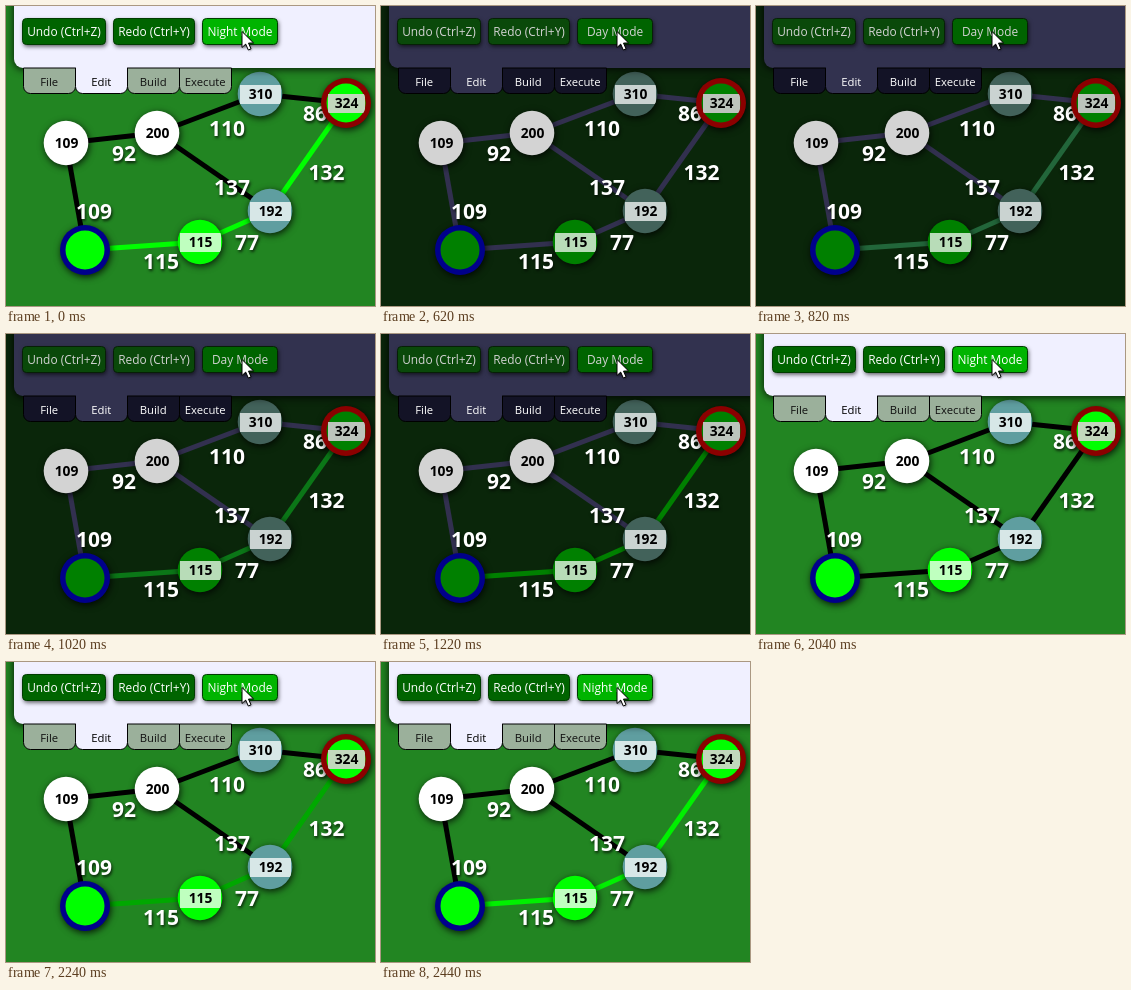
These frames come from a looping animation (369x300 px, 2.64 s). An HTML page with a canvas:

```html
<!DOCTYPE html>
<html lang="en">
<head>
<meta charset="utf-8">
<title>Graph editor day and night</title>
<style>
html, body { margin: 0; width: 100%; height: 100%; overflow: hidden; background: #228522; }
canvas { display: block; width: 369px; height: 300px; }
</style>
</head>
<body>
<canvas id="stage"></canvas>
<script>
const W = 369, H = 300, LOOP = 2640;
const FONT = '"Open Sans", "Noto Sans", sans-serif';
const canvas = document.getElementById('stage');
const ctx = canvas.getContext('2d');
const dpr = window.devicePixelRatio || 1;
canvas.width = W * dpr;
canvas.height = H * dpr;
ctx.scale(dpr, dpr);

const day = {
  bg: '#228522', panel: '#f0f0ff', tab: '#9bb09b', tabText: '#111', activeText: '#000',
  button: '#006400', hover: '#00b400', buttonText: '#fff', buttonEdge: '#003c00',
  edge: '#000', white: '#fff', teal: '#5f9ea0', green: '#00ff00', ring: '#8b0000',
  startRing: '#00008b', plate: 'rgba(255,255,255,.75)', goalPlate: '#c2d8bc',
  toggle: 'Night Mode', labelShadow: 'rgba(0,0,0,.75)'
};
const night = {
  bg: '#0a260a', panel: '#32324f', tab: '#131326', tabText: '#fff', activeText: '#fff',
  button: '#0a490a', hover: '#006400', buttonText: '#d3d3d3', buttonEdge: '#062006',
  edge: '#32304f', white: '#d3d3d3', teal: '#42625a', green: '#008000', ring: '#8b0000',
  startRing: '#00008b', plate: 'rgba(255,255,255,.72)', goalPlate: '#bcc4bc',
  toggle: 'Day Mode', labelShadow: 'rgba(0,0,0,.6)'
};

// start time, theme, colour of the highlighted path
const steps = [
  [0, day, '#00ff00'],
  [620, night, night.edge],
  [820, night, '#22663a'],
  [1020, night, '#0b7617'],
  [1220, night, '#008000'],
  [2040, day, '#000'],
  [2240, day, '#00a800'],
  [2440, day, '#00f000']
];

const nodes = {
  a: { x: 60, y: 137, text: '109', fill: 'white' },
  b: { x: 151, y: 127, text: '200', fill: 'white' },
  c: { x: 254, y: 88, text: '310', fill: 'teal' },
  goal: { x: 340, y: 97, text: '324', fill: 'green', ring: 'ring' },
  d: { x: 264, y: 205, text: '192', fill: 'teal' },
  e: { x: 194, y: 236, text: '115', fill: 'green' },
  start: { x: 79, y: 244, text: '', fill: 'green', ring: 'startRing' }
};
// ends, weight, label centre, on the path
const edges = [
  ['a', 'b', '92', 118, 148],
  ['b', 'c', '110', 221, 123],
  ['c', 'goal', '86', 309, 108],
  ['b', 'd', '137', 226, 182],
  ['a', 'start', '109', 88, 206],
  ['start', 'e', '115', 155, 256, true],
  ['e', 'd', '77', 241, 237, true],
  ['d', 'goal', '132', 320.5, 167, true]
];

function shadow(color, blur, dx = 0, dy = 0) {
  ctx.shadowColor = color;
  ctx.shadowBlur = blur * dpr;
  ctx.shadowOffsetX = dx * dpr;
  ctx.shadowOffsetY = dy * dpr;
}

function noShadow() {
  shadow('transparent', 0);
}

function text(str, x, y, size, color, weight = 400) {
  ctx.font = `${weight} ${size}px ${FONT}`;
  ctx.textAlign = 'center';
  ctx.textBaseline = 'alphabetic';
  ctx.fillStyle = color;
  ctx.fillText(str, x, y + size * 0.357);
}

function roundRect(x, y, w, h, radii) {
  ctx.beginPath();
  ctx.roundRect(x, y, w, h, radii);
}

function circle(x, y, r, fill) {
  ctx.beginPath();
  ctx.arc(x, y, r, 0, Math.PI * 2);
  ctx.fillStyle = fill;
  ctx.fill();
}

function drawEdges(theme, pathColor) {
  ctx.lineWidth = 5;
  for (const [from, to, , , , onPath] of edges) {
    ctx.strokeStyle = onPath ? pathColor : theme.edge;
    ctx.beginPath();
    ctx.moveTo(nodes[from].x, nodes[from].y);
    ctx.lineTo(nodes[to].x, nodes[to].y);
    ctx.stroke();
  }
  shadow(theme.labelShadow, 3, 1, 2);
  for (const [, , weight, x, y] of edges) text(weight, x, y, 21, '#fff', 700);
  noShadow();
}

function drawNode(node, theme) {
  const { x, y } = node;
  shadow('rgba(0,0,0,.8)', 7, 1, 2);
  if (node.ring) {
    circle(x, y, 25, theme[node.ring]);
    noShadow();
    circle(x, y, 19.5, theme[node.fill]);
  } else {
    circle(x, y, 22.3, theme[node.fill]);
    noShadow();
  }
  if (!node.text) return;
  if (node.fill !== 'white') {
    const half = node.ring ? 18 : 20;
    ctx.save();
    ctx.beginPath();
    ctx.arc(x, y, node.ring ? 20 : 22.3, 0, Math.PI * 2);
    ctx.clip();
    ctx.fillStyle = node.ring ? theme.goalPlate : theme.plate;
    ctx.fillRect(x - half, y - 9, half * 2 + 1, 19);
    ctx.restore();
  }
  text(node.text, x + 0.5, y + 0.5, 13.8, '#000', 700);
}

function drawTabs(theme) {
  ['File', 'Edit', 'Build', 'Execute'].forEach((name, i) => {
    const x = 17.5 + i * 52, active = name === 'Edit';
    roundRect(x, 62, 52, 25.5, [0, 0, 7, 7]);
    ctx.fillStyle = active ? theme.panel : theme.tab;
    ctx.fill();
    ctx.strokeStyle = '#000';
    ctx.lineWidth = 1;
    ctx.stroke();
    if (active) {
      ctx.fillStyle = theme.panel;
      ctx.fillRect(x + 0.5, 60, 51, 4);
    }
    text(name, x + 25.7, 76, 11.3, active ? theme.activeText : theme.tabText);
  });
}

function drawButton(label, x, w, fill, theme) {
  roundRect(x + 0.5, 12.5, w - 1, 26, 4);
  shadow('rgba(0,0,0,.65)', 4, 1, 2);
  ctx.fillStyle = fill;
  ctx.fill();
  noShadow();
  ctx.strokeStyle = theme.buttonEdge;
  ctx.lineWidth = 1;
  ctx.stroke();
  text(label, x + w / 2, 26, 11.9, theme.buttonText);
}

function drawPanel(theme) {
  roundRect(8, -20, W + 20, 82, [0, 0, 0, 9]);
  shadow('rgba(0,0,0,.9)', 8, 0, 1);
  ctx.fillStyle = theme.panel;
  ctx.fill();
  noShadow();
  drawTabs(theme);
  drawButton('Undo (Ctrl+Z)', 16, 84, theme.button, theme);
  drawButton('Redo (Ctrl+Y)', 107, 82, theme.button, theme);
  drawButton(theme.toggle, 196, 76, theme.hover, theme);
}

function drawCursor() {
  const points = [[0, 0], [0, 16], [3.7, 12.6], [6.3, 18.5], [9, 17.3], [6.5, 11.6], [11.5, 11.4]];
  ctx.beginPath();
  for (const [x, y] of points) ctx.lineTo(236 + x, 25.5 + y);
  ctx.closePath();
  shadow('rgba(0,0,0,.4)', 2, 1, 1);
  ctx.fillStyle = '#fff';
  ctx.fill();
  noShadow();
  ctx.strokeStyle = '#000';
  ctx.lineWidth = 1;
  ctx.stroke();
}

function draw([, theme, pathColor]) {
  ctx.fillStyle = theme.bg;
  ctx.fillRect(0, 0, W, H);
  drawEdges(theme, pathColor);
  for (const node of Object.values(nodes)) drawNode(node, theme);
  drawPanel(theme);
  drawCursor();
}

let shown = null;
const began = performance.now();

function tick() {
  const t = (performance.now() - began) % LOOP;
  const step = steps.findLast(s => s[0] <= t);
  if (step !== shown) {
    draw(step);
    shown = step;
  }
  requestAnimationFrame(tick);
}
tick();
</script>
</body>
</html>
```
